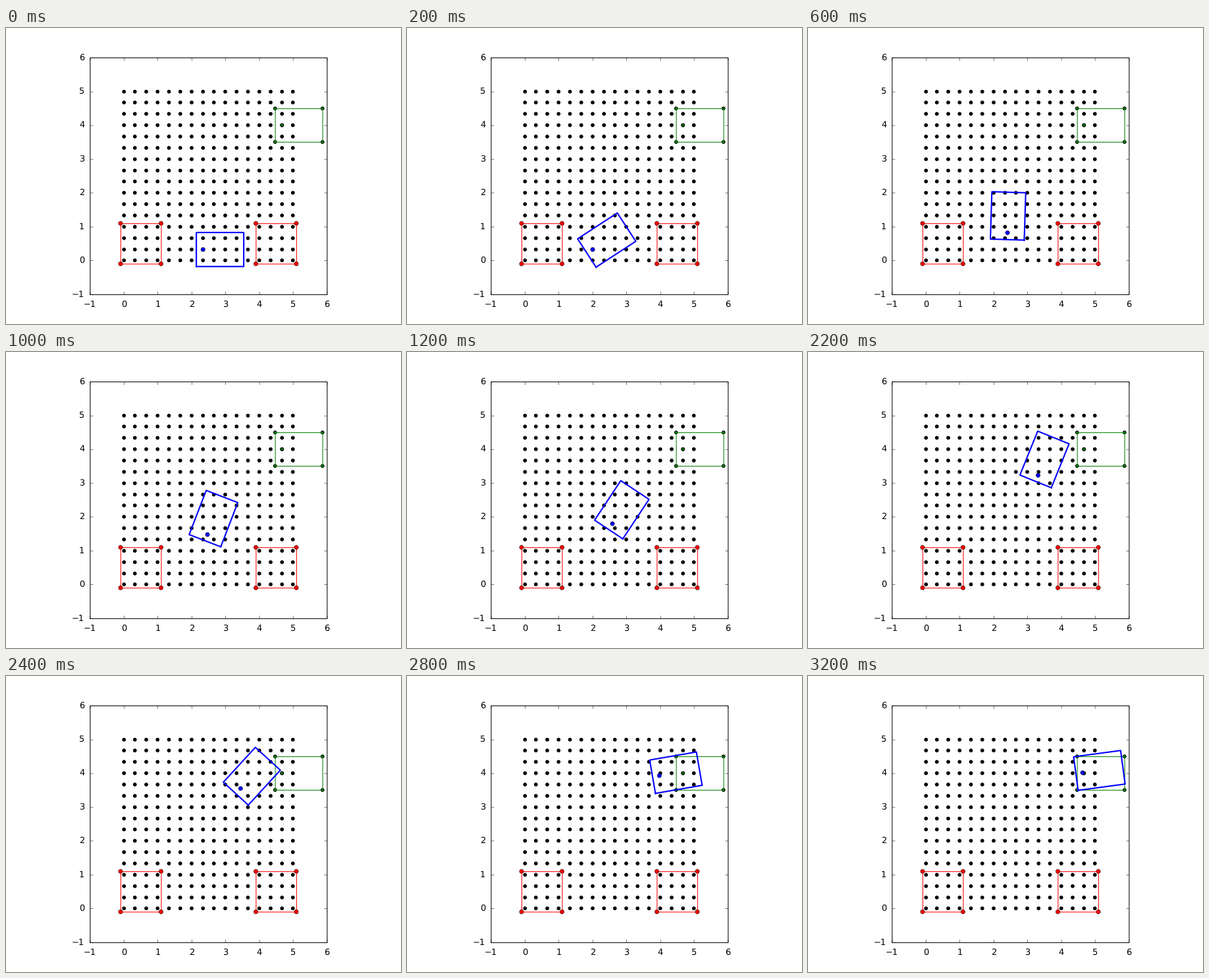
Recreate the animation shown at these times as a matplotlib script. Size 600 by 450 pixels, loop 3250 ms.

```python
import numpy as np
import matplotlib.pyplot as plt
from matplotlib.animation import FuncAnimation
from matplotlib.collections import PatchCollection
from matplotlib.patches import Circle

plt.style.use("classic")
plt.rcParams.update({"font.family": "DejaVu Sans", "font.size": 12.5,
                     "text.hinting": "none", "path.snap": False,
                     "axes.unicode_minus": True})

INTERVAL = 50        # ms per frame
FRAMES_PER_POSE = 4  # the car moves every 200 ms
FRAME_COUNT = 65
LOW, HIGH = -1, 6    # limits of both axes
CELLS = 480 / 7      # grid cells per unit that artwork is aligned to
POINT = 75 / 72 * 7 / 360  # one typographic point in data units
DOT, MARKER = np.sqrt(20) / 2, 3  # radii in points

STEP = 1 / 3
START = np.array([7 / 3, 1 / 3])
GOAL = np.array([14 / 3, 4.0])

# Heading of the car, in degrees, at each pose.
HEADINGS = np.radians([0, 33.08, 66.16, 88.2, 82.3, 68.9, 56.5, 47.5, 51.2,
                       80.5, 80.2, 68, 47.5, 25.2, 9.8, 5, 7.6])


def box(left, bottom, right, top):
    return np.array([(left, bottom), (right, bottom), (right, top),
                     (left, top), (left, bottom)])


CAR = box(-0.2, -0.5, 1.2, 0.5)


def align(points):
    """Round to the grid corners, where dots are centred."""
    return np.round((np.asarray(points) - LOW) * CELLS) / CELLS + LOW


def align_line(points):
    """Round to the grid cell centres, where straight lines run."""
    return align(points) + np.array([0.5, -0.5]) / CELLS


def drive():
    """Rear-axle positions: one step back, then forward along each heading."""
    gears = np.ones(len(HEADINGS) - 1)
    gears[0] = -1
    headings = HEADINGS[:-1]
    moves = STEP * gears[:, None] * np.column_stack(
        [np.cos(headings), np.sin(headings)])
    return np.vstack([START, START + np.cumsum(moves, axis=0)])


def car_outline(position, heading):
    if heading == 0:
        return align_line(position + CAR)
    c, s = np.cos(heading), np.sin(heading)
    return position + CAR @ np.array([[c, s], [-s, c]])


def draw_dots(centers, color, radius, edge, zorder):
    circles = [Circle(center, radius * POINT) for center in align(centers)]
    ax.add_collection(PatchCollection(circles, facecolor=color, edgecolor="k",
                                      linewidth=edge, zorder=zorder))


def draw_frame():
    length = 6 / CELLS
    for value in range(LOW, HIGH + 1):
        for edge, inward in ((LOW, length), (HIGH, -length)):
            tick = np.array([(value, edge), (value, edge)], dtype=float)
            tick = align(tick) + [(0, 0), (0, inward)]
            for points in (tick, tick[:, ::-1]):
                points = points + np.array([0.5, -0.5]) / CELLS
                ax.plot(*points.T, "k-", lw=0.5, clip_on=False,
                        solid_capstyle="butt")
    ax.plot(*align_line(box(LOW, LOW, HIGH, HIGH)).T, "k-", lw=1,
            clip_on=False, zorder=2.5)


fig = plt.figure(figsize=(8, 6), dpi=75, facecolor="white")
ax = fig.add_subplot(111)
ax.set_aspect("equal")
ax.set_xlim(LOW, HIGH)
ax.set_ylim(LOW, HIGH)
ax.set_xticks(range(LOW, HIGH + 1))
ax.set_yticks(range(LOW, HIGH + 1))
ax.tick_params(axis="x", length=0, pad=8.5)
ax.tick_params(axis="y", length=0, pad=8)
ax.spines[:].set_visible(False)
draw_frame()

grid = [(i * STEP, j * STEP) for i in range(16) for j in range(16)]
draw_dots(grid, "k", DOT, 1, zorder=1)

for left in (-0.1, 3.9):
    parked = box(left, -0.1, left + 1.2, 1.1)
    ax.plot(*align_line(parked).T, "r-", lw=1)
    draw_dots(parked[:4], "r", MARKER, 0.5, zorder=2.2)

ax.plot(*car_outline(GOAL, 0).T, "g-", lw=1)
draw_dots(np.vstack([GOAL + CAR[:4], GOAL]), "g", DOT, 1, zorder=1)

body, = ax.plot([], [], "b-", lw=2)
axle = ax.add_patch(Circle(START, MARKER * POINT, facecolor="b",
                           edgecolor="k", linewidth=0.5, zorder=2.3))
positions = drive()


def update(frame):
    pose = frame // FRAMES_PER_POSE
    body.set_data(*car_outline(positions[pose], HEADINGS[pose]).T)
    axle.set_center(align(positions[pose]))
    return body, axle


anim = FuncAnimation(fig, update, frames=FRAME_COUNT, interval=INTERVAL,
                     repeat=True, repeat_delay=0)
plt.show()
```
